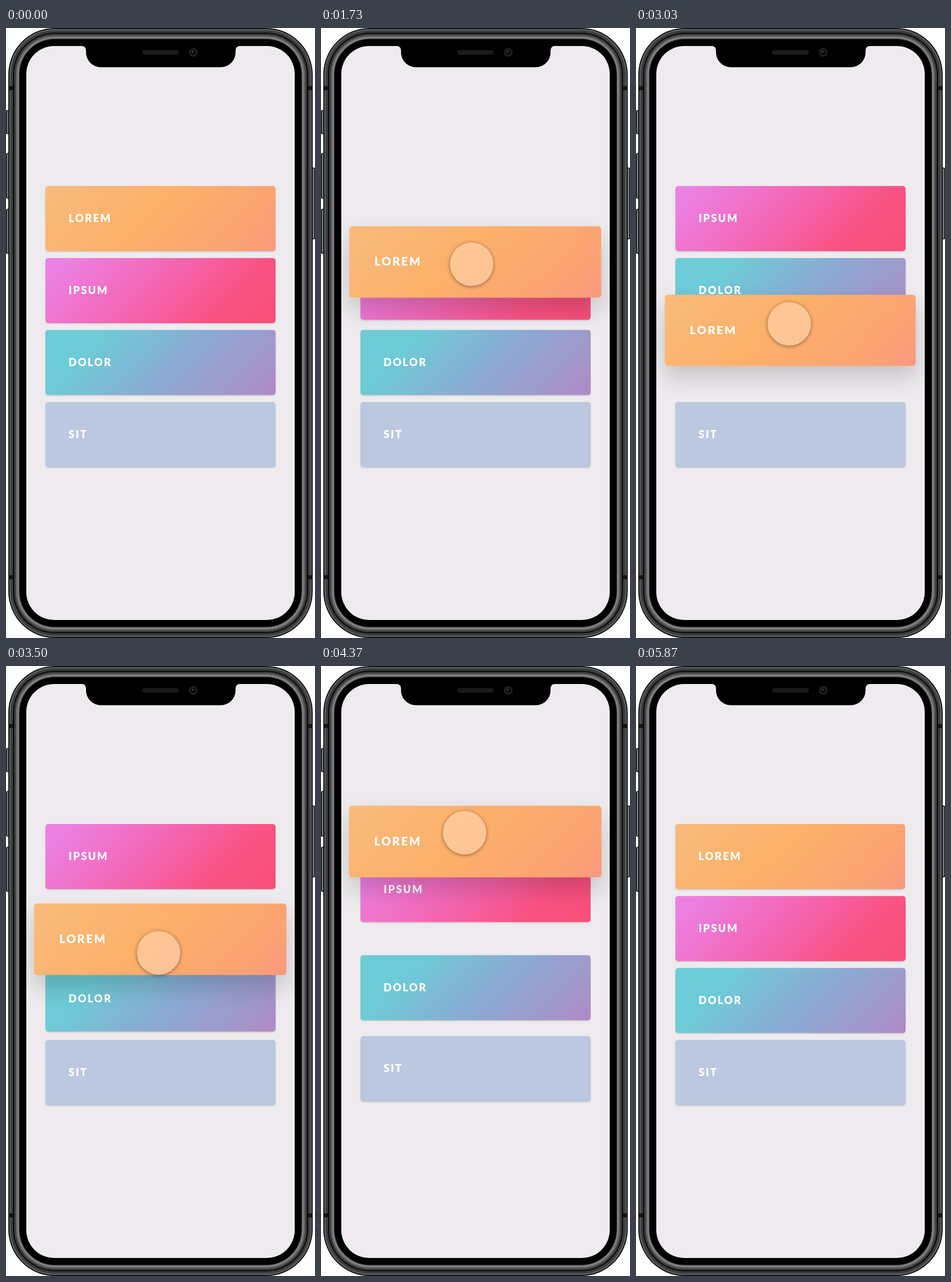
Recreate the animation shown at these times as an HTML page. Size 533 by 1050 pixels, loop 5910 ms.

```html
<!DOCTYPE html>
<html lang="en">
<head>
<meta charset="utf-8">
<title>Draggable list</title>
<style>
  html, body { margin: 0; width: 100%; height: 100%; overflow: hidden; background: #fff; }
  #stage { position: relative; width: 533px; height: 1050px; overflow: hidden; }
  svg, #screen { position: absolute; left: 0; top: 0; width: 533px; height: 1050px; }
  #screen { background: #eeebee; clip-path: inset(31px 35px 31px 35px round 48px); }
  .card {
    position: absolute; left: 68.3px; top: 0; width: 396.4px; height: 111.6px;
    box-sizing: border-box; padding-left: 39.7px; border-radius: 5px;
    font: 900 18px/111.6px Lato, sans-serif; letter-spacing: 2.2px; color: #fff;
    box-shadow: 0 1.2px 2.5px rgba(0, 0, 0, .18);
  }
  #lorem { z-index: 1; background: linear-gradient(135deg, #f9bb7c, #fcb069 45%, #fba274 85%, #fa987e); }
  #ipsum { background: linear-gradient(135deg, #ec80e2 8%, #f466b4 45%, #fa5283 76%, #f95078); }
  #dolor { background: linear-gradient(135deg, #6dccd7 20%, #8aabd3 55%, #a792c9 90%, #b287c6); }
  #sit { background: #bbc8e0; }
  #touch {
    position: absolute; z-index: 2; left: -37.5px; top: -37.5px; width: 75px; height: 75px;
    border-radius: 50%; background: rgba(255, 255, 255, .28);
    box-shadow: 0 1px 6px rgba(0, 0, 0, .45);
  }
</style>
</head>
<body>
<div id="stage">
  <svg id="body" viewBox="0 0 533 1050"></svg>
  <div id="screen">
    <div class="card" id="ipsum">IPSUM</div>
    <div class="card" id="dolor">DOLOR</div>
    <div class="card" id="sit">SIT</div>
    <div class="card" id="lorem">LOREM</div>
    <div id="touch"></div>
  </div>
  <svg viewBox="0 0 533 1050">
    <path d="M131 30v1a7 7 0 0 1 7 7v4a25.500 25.500 0 0 0 25.500 25.500h207a25.500 25.500 0 0 0 25.500-25.500v-4a7 7 0 0 1 7-7v-1z"/>
    <rect x="235" y="38" width="63" height="8" rx="4" fill="#1b1b1c"/>
    <circle cx="323" cy="42" r="7.500" fill="#202022"/>
    <circle cx="323" cy="42" r="4.500" fill="#0b0b0d"/>
    <circle cx="322" cy="40.500" r="1.500" fill="#4a4a50"/>
  </svg>
</div>
<script>
const LOOP = 5910, ROW = 123.9, FIRST = 327.8, HALF = 55.8, LAG = 24;
const $ = id => document.getElementById(id);
const slot = i => FIRST + ROW * i;
const clamp = (v, lo = 0, hi = 1) => Math.min(hi, Math.max(lo, v));

// Phone body: side buttons, nested rims from the outside in, antenna bands.
const rect = (x, y, w, h, r, fill, extra = '') =>
  `<rect x="${x}" y="${y}" width="${w}" height="${h}" rx="${r}" fill="${fill}" ${extra}/>`;
const button = (x, y, h) => rect(x, y, 8, h, 2, '#77797c', 'stroke="#111" stroke-width="1.5"');
const rim = (inset, fill) =>
  rect(4 + inset, inset, 525 - 2 * inset, 1050 - 2 * inset, 80 - inset, fill);
$('body').innerHTML =
  button(.7, 142, 40) + button(.7, 216, 77) + button(.7, 312, 76) + button(524.5, 241, 122) +
  rim(0, '#000') + rim(1.5, '#5c5d60') + rim(4, '#3c3d3f') + rim(8, '#0a0a0a') +
  rim(10, '#3a3b3d') + rim(13, '#656668') + rim(16, '#8a8b8d') + rim(18, '#3a3a3c') + rim(19.5, '#000') +
  [100, 942].map(y => rect(4, y, 8, 7, 0, '#151516') + rect(521, y, 8, 7, 0, '#151516')).join('');

// The pointer rests at a place until the next eased stroke begins.
const origin = { x: 256, y: 148 };
const strokes = [
  { start: 130, end: 1000, x: 257, y: 319 },
  { start: 1458, end: 2148, x: 264, y: 571 },
  { start: 2700, end: 3385, x: 264, y: 440 },
  { start: 3428, end: 3716, x: 256, y: 773 },
  { start: 3740, end: 4445, x: 247, y: 271 },
  { start: 4880, end: 5180, x: 247, y: 148 }
];
const drags = [{ press: 1300, release: 2150 }, { press: 2690, release: 4900 }];

function pointer(t) {
  let { x, y } = origin;
  for (const stroke of strokes) {
    const s = clamp((t - stroke.start) / (stroke.end - stroke.start));
    const ease = s * s * (3 - 2 * s);
    x += (stroke.x - x) * ease;
    y += (stroke.y - y) * ease;
  }
  return { x, y };
}

// Critically damped spring, 0 to 1, and sums of its responses to timed steps.
const spring = ms => ms <= 0 ? 0 : 1 - (1 + .013 * ms) * Math.exp(-.013 * ms);
const respond = (steps, t) => steps.reduce((sum, { at, by }) => sum + by * spring(t - at), 0);

const heldY = (drag, t) => pointer(Math.min(t, drag.release) - LAG).y + drag.offset;

// Replay the drags once: each row the held card enters pushes its neighbour back.
const order = ['lorem', 'ipsum', 'dolor', 'sit'];
const homes = { ipsum: 1, dolor: 2, sit: 3 };
const shifts = { ipsum: [], dolor: [], sit: [] };
for (const drag of drags) {
  let row = order.indexOf('lorem');
  drag.offset = slot(row) - pointer(drag.press).y;
  for (let t = drag.press; t < drag.release; t++) {
    const next = clamp(Math.round((heldY(drag, t) - FIRST) / ROW), 0, 3);
    if (next === row) continue;
    shifts[order[next]].push({ at: t, by: row - next });
    [order[row], order[next]] = [order[next], order[row]];
    row = next;
  }
  drag.home = slot(row);
}
const lift = drags.flatMap(d => [{ at: d.press, by: 1 }, { at: d.release, by: -1 }]);

function draggedY(t) {
  const drag = drags.filter(d => t >= d.press).pop();
  if (!drag) return slot(0);
  const held = heldY(drag, t);
  return held + (drag.home - held) * spring(t - drag.release);
}

function place(id, y, scale = 1) {
  $(id).style.transform = `translateY(${y - HALF}px) scale(${scale})`;
}

function render(t) {
  for (const id in shifts) place(id, slot(homes[id] + respond(shifts[id], t)));

  const up = respond(lift, t), depth = 1.24 * (1 + 14 * up);
  place('lorem', draggedY(t), 1 + .1 * up);
  $('lorem').style.boxShadow = `0 ${depth}px ${2 * depth}px rgba(0, 0, 0, .18)`;

  const { x, y } = pointer(t);
  $('touch').style.transform = `translate(${x}px, ${y}px)`;
  $('touch').style.opacity = Math.min(clamp((t - 60) / 180), clamp((5350 - t) / 180));
}

const began = performance.now();
function tick() {
  render((performance.now() - began) % LOOP);
  requestAnimationFrame(tick);
}
tick();
</script>
</body>
</html>
```
